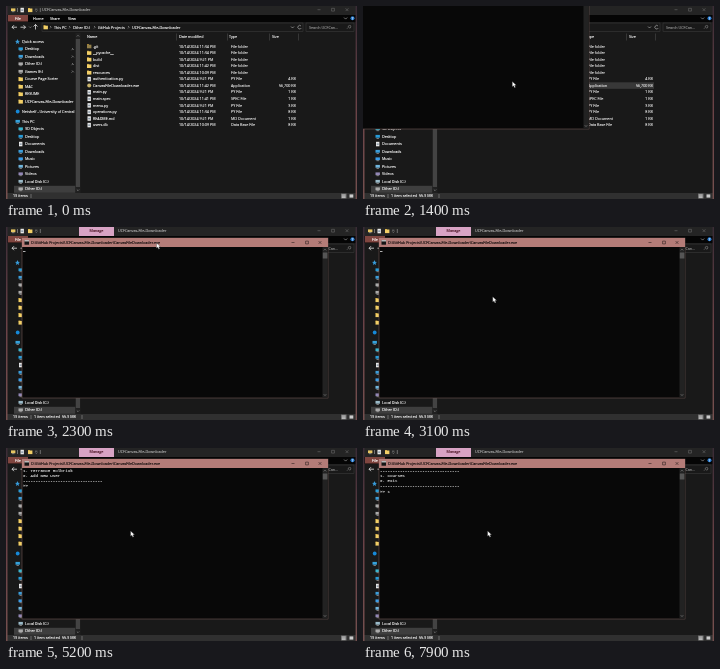
Write an HTML page that moves like this. It is 351 by 193 pixels and loops after 8000 ms.

```html
<!DOCTYPE html>
<html lang="en">
<head>
<meta charset="utf-8">
<title>File downloader</title>
<style>
html, body { margin: 0; width: 100%; height: 100%; overflow: hidden; background: #000; }
svg { display: block; width: 100%; height: 100%; }
text { font: 3.7px "Open Sans", "Noto Sans", sans-serif; white-space: pre; stroke-width: 0.13px; }
.mono { font: 4.15px "Liberation Mono", monospace; }
</style>
</head>
<body>
<svg id="stage" viewBox="0 0 351 193">
  <linearGradient id="desk" x2="0" y2="1">
    <stop offset="0" stop-color="#3a2c36"/>
    <stop offset="0.5" stop-color="#6a4247"/>
    <stop offset="1" stop-color="#75504f"/>
  </linearGradient>
</svg>
<script>
const LOOP = 8000, STEP = 100;
const stage = document.getElementById('stage');

function add(parent, tag, attrs = {}, content) {
  const node = document.createElementNS('http://www.w3.org/2000/svg', tag);
  for (const key in attrs) node.setAttribute(key, attrs[key]);
  if (content !== undefined) node.textContent = content;
  parent.append(node);
  return node;
}
const group = parent => add(parent, 'g');
const rect = (parent, x, y, width, height, fill, more) =>
  add(parent, 'rect', { x, y, width, height, fill, ...more });
// y is the vertical middle of the line
const label = (parent, x, y, content, fill = '#f4f4f4', more) =>
  add(parent, 'text', { x, y: y + 1.3, fill, stroke: fill, ...more }, content);
const line = (parent, d, stroke = '#ddd', width = 0.5) =>
  add(parent, 'path', { d, stroke, 'stroke-width': width, fill: 'none' });
const show = (node, on) => node.setAttribute('display', on ? 'inline' : 'none');
const place = (node, [x, y]) => node.setAttribute('transform', `translate(${x} ${y})`);

function folder(parent, x, y, fill = '#f2cf66') {
  rect(parent, x, y - 2, 2, 1, '#c99a2e');
  rect(parent, x, y - 1.5, 4.4, 3.6, fill);
}
function sheet(parent, x, y) {
  rect(parent, x + 0.5, y - 2.2, 3.4, 4.5, '#e8e8e8');
  rect(parent, x + 1.2, y - 0.6, 2, 1.5, '#8a9aa8');
}
function device(parent, x, y, fill) {
  rect(parent, x, y - 1.6, 4.4, 2.8, fill);
  rect(parent, x + 1, y + 1.5, 2.4, 0.6, '#bbb');
}
function controls(parent, xs, y, stroke) {
  const [a, b, c] = xs;
  line(parent, `M${a - 1.5} ${y}h3M${b - 1.4} ${y - 1.4}h2.8v2.8h-2.8z` +
    `M${c - 1.4} ${y - 1.4}l2.8 2.8m0 -2.8l-2.8 2.8`, stroke);
}

// Explorer window
const explorer = group(stage);
rect(explorer, 0, 0, 351, 193, '#191919');
rect(explorer, 0, 0, 351, 9, '#242424');
rect(explorer, 0, 9, 351, 7, '#050505');
rect(explorer, 2, 9, 20, 6.5, '#804640');
label(explorer, 9, 12.2, 'File', '#fff');
[['Home', 28], ['Share', 45], ['View', 63]].forEach(([name, x]) => label(explorer, x - 1, 12.2, name));
device(explorer, 5, 4, '#e6c562');
sheet(explorer, 14, 4);
folder(explorer, 22, 4);
line(explorer, 'M11.5 2v4M29 3.2h2.4M29.3 4.5l1 1 1-1M34.3 2v4', '#bbb');
controls(explorer, [313, 327, 341], 3.7, '#777');
line(explorer, 'M338 11.5l1.6 1.6 1.6-1.6');
add(explorer, 'circle', { cx: 346.5, cy: 12.2, r: 2, fill: '#2479cf' });
label(explorer, 346.5, 12.2, '?', '#fff', { 'text-anchor': 'middle' });

rect(explorer, 36, 17, 261, 8.4, '#191919', { stroke: '#404040', 'stroke-width': 0.5 });
rect(explorer, 300, 17, 48, 8.4, '#191919', { stroke: '#404040', 'stroke-width': 0.5 });
line(explorer, 'M11 21.2h-5m2-2l-2 2 2 2M14.5 21.2h5m-2-2l2 2-2 2M29.5 23.5v-5m-2 2l2-2 2 2', '#fff', 0.7);
line(explorer, 'M285 20.5l1.5 1.5 1.5-1.5M295 20a1.8 1.8 0 1 0 .3 2');
line(explorer, 'M23 20.5l1.3 1.3 1.3-1.3', '#aaa');
folder(explorer, 37.5, 21.2);
[['This PC', 48], ['Other (D:)', 67], ['GitHub Projects', 92], ['UCFCanvas-File-Downloader', 126]].forEach(([name, x]) => {
  label(explorer, x, 21.2, name);
  line(explorer, `M${x - 4} 20l1.2 1.2-1.2 1.2`, '#ccc', 0.5);
});
label(explorer, 303, 21.2, 'Search UCFCan...', '#8d8d8d');
line(explorer, 'M341 22.7l1.4-1.4a1.3 1.3 0 1 1 .6.6', '#999');

// Navigation pane
rect(explorer, 8, 179.8, 61.5, 7, '#3e3e3e');
const navRows = [
  ['Quick access', 35.5, 'star'], ['Desktop', 43, '#279bd8'], ['Downloads', 50.5, '#3b9edb'],
  ['Other (D:)', 58, '#aaa'], ['Games (E:)', 65.5, '#aaa'], ['Course Page Sorter', 73],
  ['MAC', 80.5], ['RESUME', 88], ['UCFCanvas-File-Downloader', 95.5],
  ['Netshelf - University of Central', 105.5, 'dot'], ['This PC', 115.5, '#35a2dc'],
  ['3D Objects', 123, '#39b5cf'], ['Desktop', 130.5, '#279bd8'], ['Documents', 138, 'sheet'],
  ['Downloads', 145.5, '#3b9edb'], ['Music', 153, '#3a9ce8'], ['Pictures', 160.5, '#70b6de'],
  ['Videos', 168, '#9287b5'], ['Local Disk (C:)', 175.5, '#9abac8'], ['Other (D:)', 183, '#aaa']
];
for (const [name, y, icon] of navRows) {
  const top = [35.5, 105.5, 115.5].includes(y), x = top ? 9.5 : 12.5;
  if (!icon) folder(explorer, x, y);
  else if (icon === 'sheet') sheet(explorer, x, y);
  else if (icon === 'dot') add(explorer, 'circle', { cx: x + 2.2, cy: y, r: 1.9, fill: '#1689d8' });
  else if (icon === 'star') add(explorer, 'path', { d: `M${x + 2} ${y - 2.4}l.7 1.6 1.8.2-1.4 1.2.5 1.8-1.6-1-1.6 1 .5-1.8-1.4-1.2 1.8-.2z`, fill: '#389bd9' });
  else device(explorer, x, y, icon);
  label(explorer, top ? 16 : 19, y, name);
  if (y > 40 && y < 70) line(explorer, `M65.5 ${y + 1.2}l1.2-1.2m-.7-1l1.8 1.8`, '#bbb');
}
rect(explorer, 69.5, 27, 5, 160, '#202020');
rect(explorer, 69.8, 33, 4.2, 148, '#434343');
line(explorer, 'M70.8 30.5l1.2-1.2 1.2 1.2M70.8 183.5l1.2 1.2 1.2-1.2', '#aaa');

// File list
[['Name', 81], ['Date modified', 173], ['Type', 223], ['Size', 266]].forEach(([name, x]) => label(explorer, x, 31, name));
[170.5, 221, 263.5, 292].forEach(x => rect(explorer, x, 27.5, 0.5, 7, '#555'));
const rowMark = rect(explorer, 80, 76.3, 211, 6.5, '#4d4d4d');
const files = [
  ['.git', '11:34', 'File folder'], ['__pycache__', '11:34', 'File folder'],
  ['build', '9:21', 'File folder'], ['dist', '11:42', 'File folder'],
  ['resources', '10:09', 'File folder'], ['authentication.py', '9:21', 'PY File', '4 KB'],
  ['CanvasFileDownloader.exe', '11:42', 'Application', '56,700 KB'],
  ['main.py', '9:21', 'PY File', '1 KB'], ['main.spec', '11:41', 'SPEC File', '1 KB'],
  ['menu.py', '9:21', 'PY File', '3 KB'], ['operations.py', '11:34', 'PY File', '8 KB'],
  ['README.md', '9:21', 'MD Document', '1 KB'], ['users.db', '10:09', 'Data Base File', '8 KB']
];
files.forEach(([name, time, type, size], i) => {
  const y = 40.2 + i * 6.57;
  if (!size) folder(explorer, 81, y, i ? undefined : '#94804a');
  else if (type === 'Application') add(explorer, 'circle', { cx: 83.2, cy: y, r: 2, fill: '#c9b46a' });
  else sheet(explorer, 81, y);
  label(explorer, 87, y, name);
  label(explorer, 173, y, `10/14/2024 ${time} PM`, '#e2e2e2');
  label(explorer, 225, y, type, '#e2e2e2');
  if (size) label(explorer, 290, y, size, '#e2e2e2', { 'text-anchor': 'end' });
});

// Title and status parts that follow the selection
const plainTitle = label(explorer, 36, 4, 'UCFCanvas-File-Downloader', '#aaa');
const selected = group(explorer);
rect(selected, 73, 0, 35, 9, '#d8a3c4');
label(selected, 90.5, 4, 'Manage', '#4b1525', { 'text-anchor': 'middle' });
label(selected, 112, 4, 'UCFCanvas-File-Downloader', '#aaa');
rect(explorer, 0, 187, 351, 6, '#303030');
label(explorer, 7, 190, '13 items');
line(explorer, 'M25 188v4', '#aaa');
const statusMark = group(explorer);
line(statusMark, 'M76 188v4', '#aaa');
label(statusMark, 28, 190, '1 item selected  55.3 MB');
rect(explorer, 335, 187.6, 5.5, 4.8, '#777');
line(explorer, 'M336 189h3.5m-3.5 1.3h3.5m-3.5 1.3h3.5', '#fff');
rect(explorer, 343.5, 188.4, 3.8, 3.2, '#ccc');
rect(explorer, 0, 0, 1.5, 193, 'url(#desk)');
rect(explorer, 349.6, 0, 1.4, 193, 'url(#desk)');

// Console window, drawn from its own top left corner
const shell = group(stage);
rect(shell, 0, 0, 306, 160, '#080808', { stroke: '#6d5452', 'stroke-width': 0.6 });
rect(shell, 0, 0, 306, 9, '#b47c78');
rect(shell, 2.5, 2.2, 4.5, 4.5, '#151515');
rect(shell, 2.5, 2.2, 4.5, 1.2, '#ddd');
label(shell, 9, 4.6, 'D:\\GitHub Projects\\UCFCanvas-File-Downloader\\CanvasFileDownloader.exe', '#110c0c');
controls(shell, [271, 285, 298], 4.5, '#171010');
rect(shell, 300.5, 9.2, 5.2, 150.5, '#222');
rect(shell, 300.8, 14.5, 4.6, 6, '#555');
line(shell, 'M301.8 12.4l1.2-1.2 1.2 1.2M301.8 156.3l1.2 1.2 1.2-1.2', '#aaa');
const output = Array.from({ length: 5 }, (_, i) => label(shell, 1, 11.8 + i * 5.1, '', '#dedede', { class: 'mono' }));
const caret = rect(shell, 0, 0, 2.5, 0.8, '#ddd');

const pointer = add(stage, 'path', {
  d: 'M0 0v5.3l1.3-1.1.9 2 1-.5-.9-1.9h1.7z', fill: '#fff', stroke: '#222', 'stroke-width': 0.3
});

const pointerPath = [
  [0, 215, 200], [200, 215, 200], [700, 141, 81], [1000, 141, 81], [1300, 149.3, 75.5],
  [1500, 149.3, 75.5], [1800, 54.5, -32], [1900, 54.5, -32], [2300, 150.5, 16], [2600, 150.5, 16],
  [3300, 124.6, 83], [LOOP, 124.6, 83]
];
const shellPath = [[0, -80, -37], [1900, -80, -37], [2300, 16, 11], [LOOP, 16, 11]];

function along(path, t) {
  const i = path.findIndex(point => point[0] > t);
  const [t0, x0, y0] = path[i - 1], [t1, x1, y1] = path[i];
  const u = (t - t0) / (t1 - t0), k = u * u * (3 - 2 * u);
  return [x0 + (x1 - x0) * k, y0 + (y1 - y0) * k];
}

const rule = '-'.repeat(32);
function consoleLines(t) {
  if (t < 4900) return [''];
  if (t < 6600) return ['1. Terrance Holbrick', '2. Add New User', rule, '>> ' + (t < 6200 ? '' : '1')];
  if (t < 7000) return [''];
  return [rule, '1. Courses', '2. Exit', rule, '>> ' + (t < 7700 ? '' : '1')];
}

function draw(t) {
  const chosen = t >= 1000;
  show(rowMark, t >= 700);
  rowMark.setAttribute('fill', chosen ? '#383838' : '#404040');
  show(plainTitle, !chosen);
  show(selected, chosen);
  show(statusMark, chosen);

  show(shell, t >= 1200);
  place(shell, along(shellPath, t));
  const lines = consoleLines(t);
  output.forEach((node, i) => { node.textContent = lines[i] || ''; });
  const last = lines.length - 1;
  caret.setAttribute('x', 1 + lines[last].length * 2.49);
  caret.setAttribute('y', 13.2 + last * 5.1);
  show(caret, (t + 1156) % 1060 < 530);

  place(pointer, along(pointerPath, t));
}

const start = performance.now();
function tick() {
  const t = (performance.now() - start) % LOOP;
  draw(Math.floor(t / STEP) * STEP);
  requestAnimationFrame(tick);
}
tick();
</script>
</body>
</html>
```
